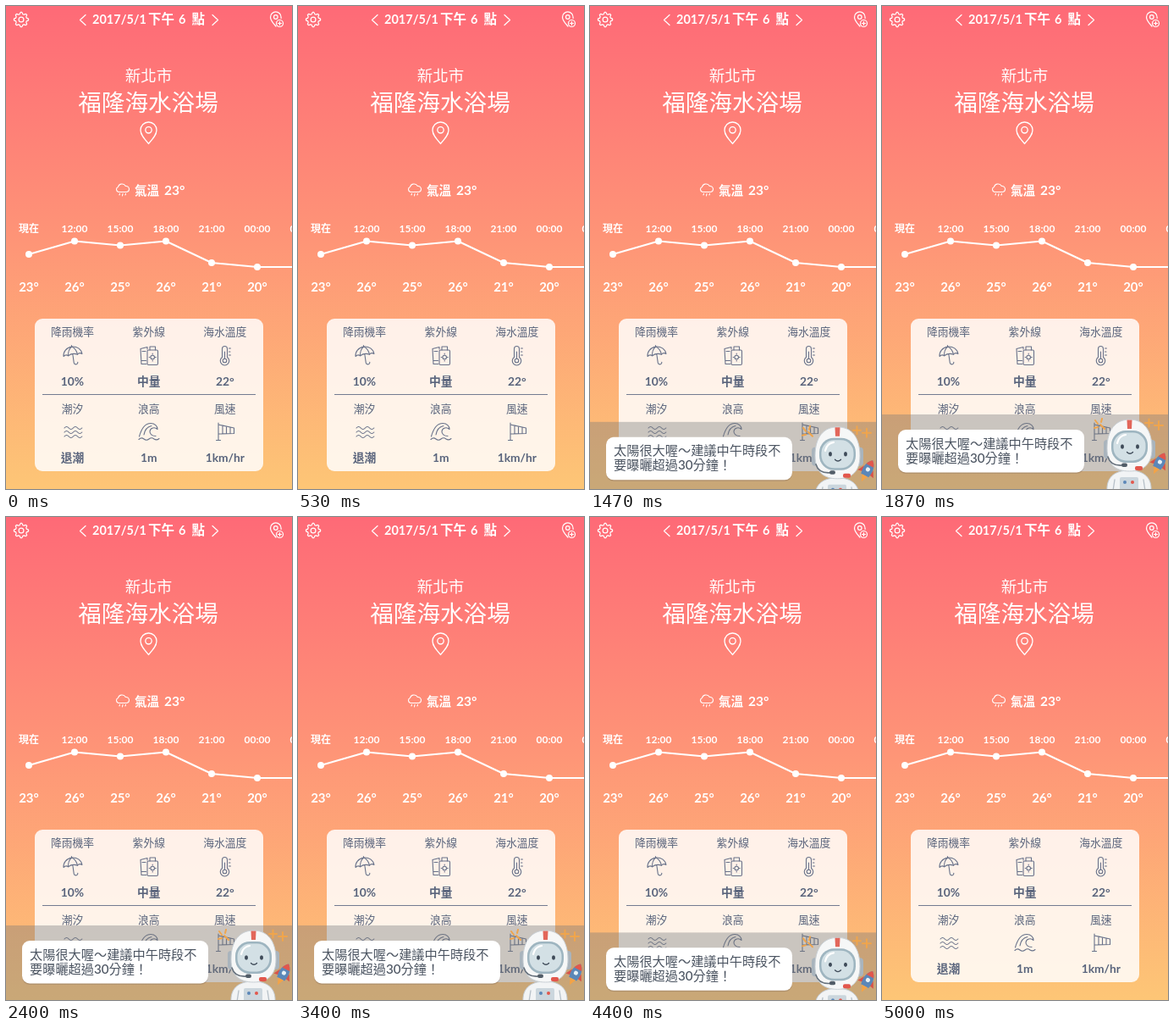
An HTML page for the animation above (5.07 s loop, 338 by 570 pixels).

```html
<!DOCTYPE html>
<html lang="zh-Hant">
<head>
<meta charset="utf-8">
<title>海灘天氣</title>
<style>
  html, body { margin: 0; width: 100%; height: 100%; overflow: hidden; background: #fe9577; }
  svg { display: block; width: 100vw; height: 100vh; }
  text { font-family: Lato, "Noto Sans CJK TC", "Noto Sans CJK SC", "Noto Sans CJK JP", "Noto Sans CJK", sans-serif; font-weight: 500; }
  .num { font-weight: 700; }
  .line { fill: none; stroke-linecap: round; stroke-linejoin: round; }
  .mid { text-anchor: middle; }
</style>
</head>
<body>
<svg viewBox="0 0 338 570" xmlns="http://www.w3.org/2000/svg">
  <defs>
    <linearGradient id="sky" x1="0" y1="0" x2="0" y2="1">
      <stop offset="0" stop-color="#fe6a77"/>
      <stop offset=".5" stop-color="#fe9677"/>
      <stop offset="1" stop-color="#fdc676"/>
    </linearGradient>
  </defs>
  <rect width="338" height="570" fill="url(#sky)"/>

  <!-- header -->
  <g class="line" stroke="#fff" stroke-width="1.2">
    <path id="gear"/>
    <circle cx="18" cy="16" r="2.9"/>
    <path d="M94 10.5L87.5 16.5L94 22.5M244 10.5L250.5 16.5L244 22.5"/>
    <path d="M319 24C316 20.5 312.500 17 312.500 13.200A6.300 6.300 0 0 1 325.100 13.200V14.500"/>
    <circle cx="318.800" cy="13" r="2.300"/>
    <circle cx="323.500" cy="20.500" r="4"/>
    <path d="M321.500 20.500H325.500M323.500 18.500V22.500"/>
  </g>
  <g fill="#fff">
    <text class="num" y="20.500" font-size="14.500"><tspan x="102">2017/5/1</tspan><tspan x="168" font-size="15.500">下午</tspan><tspan x="204">6</tspan><tspan x="219.500" font-size="15.500">點</tspan></text>
    <text class="mid" x="168.500" y="88.500" font-size="18.500">新北市</text>
    <text class="mid" x="168" y="123.500" font-size="27.600">福隆海水浴場</text>
    <text class="num" y="222.500" font-size="14.500"><tspan x="152">氣溫</tspan><tspan x="187" font-size="15.500">23°</tspan></text>
  </g>
  <g class="line" stroke="#fff" stroke-width="1.300">
    <path d="M168.500 162.500C163.500 157 159 152 159 146.500A9.500 9.500 0 0 1 178 146.500C178 152 173.500 157 168.500 162.500Z"/>
    <circle cx="168.500" cy="146.300" r="3.700"/>
    <path stroke-width="1.100" d="M133 219.500A3.200 3.200 0 0 1 132.500 213.400A4.800 4.800 0 0 1 141.300 212.500A3.500 3.500 0 0 1 142.500 219.500ZM134.500 221.500L134 223M138 221.500L137.500 224M141.500 221.500L141 223"/>
  </g>

  <!-- hourly temperatures -->
  <g id="hours" fill="#fff"></g>

  <!-- details -->
  <rect x="34" y="369" width="270" height="180" rx="9" fill="#fff" fill-opacity=".84"/>
  <path d="M43 458.500H295" stroke="#737b91" stroke-width="1.200"/>
  <g id="details" fill="#59647c"></g>
  <g class="line" stroke="#68728a" stroke-width="1.100">
    <g transform="rotate(-8 79 412)">
      <path d="M68 412A11 10 0 0 1 90 412Q87 409.500 84.500 412Q79 409 73.500 412Q71 409.500 68 412ZM79 400.500V402M79 411V421A2.300 2.300 0 0 0 83.600 421"/>
      <path d="M73.500 412Q74 405 79 402Q84 405 84.500 412"/>
    </g>
    <path d="M159 404.500L167 402.500V405M159 404.500L160 422.500H166M160 418.500H165.500M161 407.500H165"/>
    <rect x="167" y="406" width="12.500" height="17.500" rx="1.500"/>
    <path d="M170 406V402H176.500V406M173.200 411V410M173.200 419V418M169.200 414.500H170M176.500 414.500H177.300"/>
    <circle cx="173.200" cy="414.500" r="2.300"/>
    <path d="M255.500 414.500V404.500A3 3 0 0 1 261.500 404.500V414.500A5.200 5.200 0 1 1 255.500 414.500ZM258.500 408V416M263.500 404H265.500M263.500 408H265M263.500 412H265.500"/>
    <circle cx="258.500" cy="418.500" r="2.300"/>
    <path id="tide"/>
    <path d="M157.500 508C160 499 164 492.500 171 492.500C176 492.500 179 496 179 499.500C176 496.500 170.500 497.500 170 502C169.800 505 172.500 507.500 177 507.500M163 506C164 500 167 496.500 172 495.500M157 511.500Q160 508.500 163 511Q166 513.500 169 511Q172 508.500 175 511Q178 513 181 510.500"/>
    <path d="M251 492V512.500M248.500 512.500H253.500M251 494L269.500 498V504.500L251 505ZM256 495.200V505M260.500 496.200V504.800M265 497.200V504.600"/>
  </g>

  <!-- assistant -->
  <g id="panel">
    <rect y="482" width="338" height="90" fill="#74777a" fill-opacity=".38"/>
    <rect x="19" y="501" width="220" height="51" rx="9" fill="#6b5a50" fill-opacity=".25"/>
    <rect x="19" y="500" width="220" height="50.500" rx="9" fill="#fff"/>
    <g fill="#4b5461" font-size="15.200">
      <text x="28" y="521.500">太陽很大喔～建議中午時段不</text>
      <text x="28" y="538.500">要曝曬超過30分鐘！</text>
    </g>
    <g class="line" stroke="#f0a54c" stroke-width="2">
      <path d="M315.500 487.500V496.500M311 492H320M327 490V500M322 495H332" />
      <path d="M252 489L255 493M260 487L259 491M251 498L255 497M258 494L263 499" />
    </g>
    <g id="rocket" transform="rotate(28 328 539)">
      <path d="M322 536L317.500 544L323 543ZM334 536L338.500 544L333 543Z" fill="#d9534a"/>
      <path d="M328 526C334 531 335 538 333 546H323C321 538 322 531 328 526Z" fill="#5b87b8"/>
      <path d="M328 526C330.500 528 332 530.500 332.800 533H323.200C324 530.500 325.500 528 328 526Z" fill="#e2574c"/>
      <circle cx="328" cy="538" r="2.500" fill="#e8f1f5"/>
      <path d="M324.500 546H331.500L328 554Z" fill="#f3a347"/>
    </g>
    <path d="M266 572C265 558 273 548 292 548C311 548 319 558 318 572Z" fill="#f2f4f5" stroke="#c3cbd2"/>
    <path d="M273 572L275 559M311 572L309 559" class="line" stroke="#b6c0c8" stroke-width="1.300"/>
    <rect x="281" y="556" width="22" height="16" rx="2" fill="#cbd6dd"/>
    <circle cx="287" cy="562" r="2" fill="#5b87b8"/>
    <circle cx="296" cy="562" r="2" fill="#e2574c"/>
    <rect x="262" y="512" width="9" height="22" rx="4" fill="#a9b4bd"/>
    <rect x="314" y="512" width="9" height="22" rx="4" fill="#a9b4bd"/>
    <path d="M266 522C266 500 276 488 292.500 488C309 488 319 500 319 522C319 541 309 549 292.500 549C276 549 266 541 266 522Z" fill="#f6f7f7" stroke="#c9d0d5"/>
    <path d="M289.500 488.500H295.500L295 499H290Z" fill="#e2665a"/>
    <rect x="271" y="501" width="43" height="38" rx="17" fill="#9eb5c0"/>
    <rect x="273.500" y="503.500" width="38" height="33" rx="15" fill="#d3e0e5"/>
    <path d="M278 516Q280 507 288 506" class="line" stroke="#fff" stroke-width="2.200"/>
    <g id="eyes" fill="#3f4b59">
      <ellipse cx="284" cy="520" rx="2" ry="2.700"/>
      <ellipse cx="302" cy="520" rx="2" ry="2.700"/>
    </g>
    <path d="M289.500 526.500Q293 530 296.500 526.500" class="line" stroke="#3f4b59" stroke-width="1.400"/>
    <path d="M267 532Q270 543 284 542" class="line" stroke="#66717c" stroke-width="1.600"/>
    <rect x="283" y="539.500" width="7" height="4.500" rx="2.200" fill="#525d68"/>
    <rect x="299" y="543" width="9" height="5" rx="2" fill="#e2574c"/>
  </g>
</svg>
<script>
const $ = id => document.getElementById(id);
const label = (x, y, size, str, cls = '') =>
  `<text class="mid ${cls}" x="${x}" y="${y}" font-size="${size}">${str}</text>`;

// gear outline: eight teeth
let gear = '';
for (let i = 0; i < 32; i++) {
  const a = (i - .5) * Math.PI / 16;
  const r = i % 4 < 2 ? 8.6 : 6.6;
  gear += `${i ? 'L' : 'M'}${18 + r * Math.cos(a)} ${16 + r * Math.sin(a)}`;
}
$('gear').setAttribute('d', gear + 'Z');

$('tide').setAttribute('d', [498, 503, 508].map(y =>
  `M69 ${y}q2.600-3 5.200 0t5.200 0t5.200 0t5.200 0`).join(''));

const hours = [
  ['現在', 293, 23], ['12:00', 277.5, 26], ['15:00', 282.5, 25], ['18:00', 277.5, 26],
  ['21:00', 303, 21], ['00:00', 308, 20], ['03:00', 308, 20]
];
const hourX = i => 27 + 54 * i;
$('hours').innerHTML =
  `<polyline class="line" stroke="#fff" stroke-width="2" points="${hours.map((h, i) => hourX(i) + ',' + h[1]).join(' ')}"/>` +
  hours.map(([name, y, temp], i) => {
    const x = hourX(i);
    return label(x, 267, 12, name, 'num') + `<circle cx="${x}" cy="${y}" r="4"/>` +
      (i < 6 ? label(x, 336.5, 15, temp + '°', 'num') : '');
  }).join('');

const cells = [
  ['降雨機率', '10%'], ['紫外線', '中量'], ['海水溫度', '22°'],
  ['潮汐', '退潮'], ['浪高', '1m'], ['風速', '1km/hr']
];
$('details').innerHTML = cells.map(([name, value], i) => {
  const x = [78.5, 168.8, 258.8][i % 3];
  const low = i > 2;
  return label(x, low ? 480 : 389, 12.8, name) + label(x, low ? 537.5 : 447.5, 13.8, value, 'num');
}).join('');

const LOOP = 5070, STEP = 200 / 3, HEIGHT = 92;
const clamp = v => Math.max(0, Math.min(1, v));

function draw() {
  const now = performance.now() % LOOP;
  const t = Math.floor((now + 4) / STEP) * STEP;
  const enter = 1 - clamp((t - 1190) / 510);
  const leave = clamp((t - 4320) / 430);
  const drop = HEIGHT * (t < 3000 ? enter ** 3 : leave * leave * (3 - 2 * leave));
  $('panel').setAttribute('transform', `translate(0 ${drop})`);
  $('panel').style.visibility = drop >= HEIGHT ? 'hidden' : 'visible';
  requestAnimationFrame(draw);
}
draw();
</script>
</body>
</html>
```
